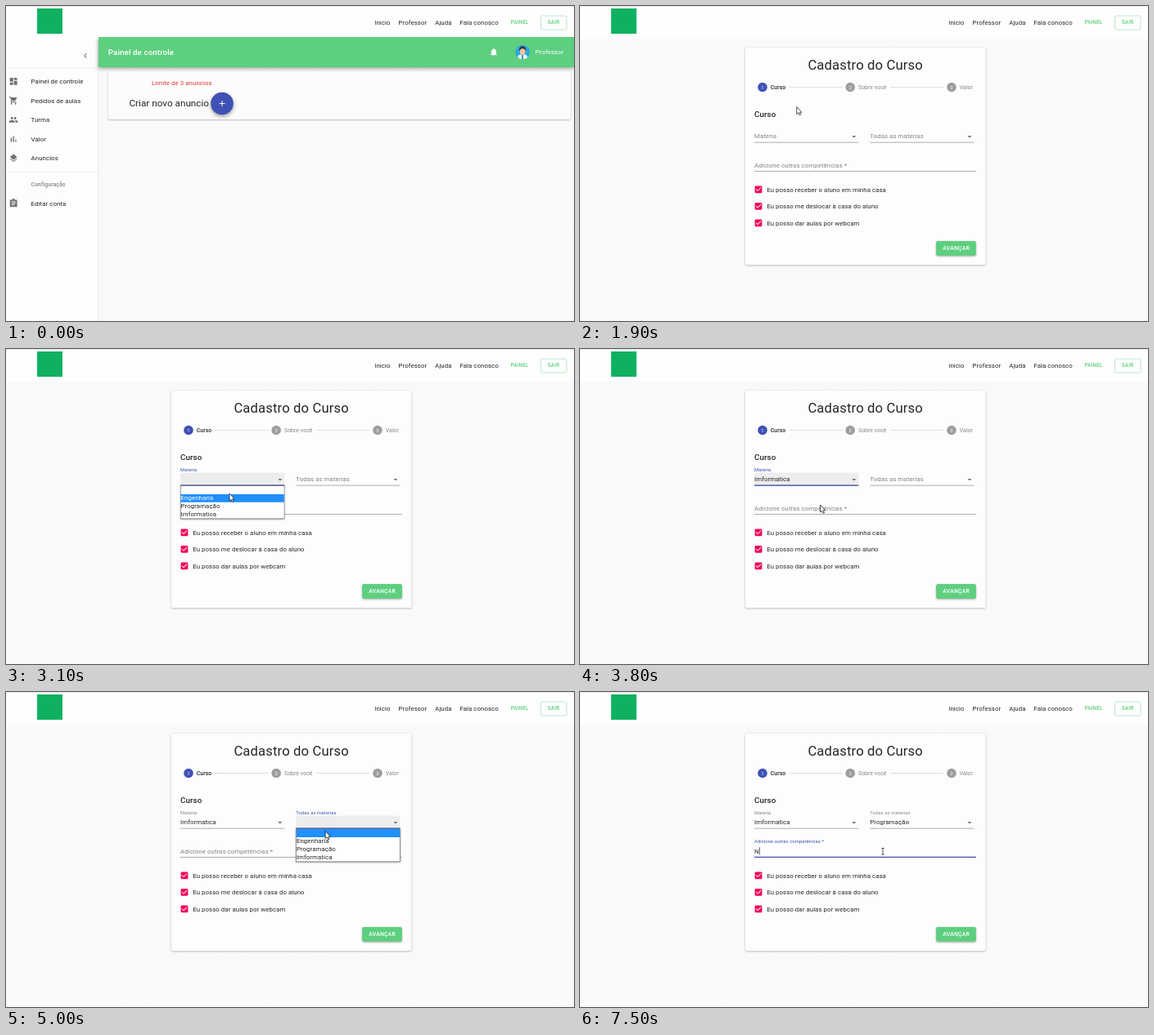
These frames come from a looping animation (694 by 386 pixels, 8 s). An HTML page with a canvas:

```html
<!DOCTYPE html>
<html lang="pt">
<head>
<meta charset="utf-8">
<title>Cadastro do Curso</title>
<style>
  html, body { margin: 0; width: 100%; height: 100%; overflow: hidden; background: #fbfbfb; }
  canvas { display: block; width: 100vw; height: 100vh; }
</style>
</head>
<body>
<canvas id="stage" width="694" height="386"></canvas>
<script>
const W = 694, H = 386, LOOP = 8000, STEP = 100;
const UNIT = 0.49; // screen pixels per interface pixel
const ctx = document.getElementById('stage').getContext('2d');

const INK = '#262626', GREY = '#858585', ICON = '#707070';
const GREEN = '#5dcf7f', BLUE = '#3f51b5', PINK = '#f50057';

const ICONS = {
  back: 'M15.4 7.4L14 6l-6 6 6 6 1.4-1.4L10.8 12z',
  dashboard: 'M3 13h8V3H3zM3 21h8v-6H3zM13 21h8V11h-8zM13 3v6h8V3z',
  cart: 'M1 2h3.3l1 2H21l-5 9H8l-1 2h12v2H5l-.2-2.5 1.8-3L3 4H1zM7 22a2 2 0 1 1 .1 0zM17 22a2 2 0 1 1 .1 0z',
  people: 'M16 11a3 3 0 1 1 .1 0zM8 11a3 3 0 1 1 .1 0zM1 19v-2.5c0-4.6 14-4.6 14 0V19zM17 19v-2.5c0-1.5-.8-2.6-2-3.4 3-.4 8 .9 8 3.4V19z',
  chart: 'M5 9.2h3V19H5zM10.6 5h2.8v14h-2.8zM16.2 13H19v6h-2.8z',
  layers: 'M12 18.5l-7.4-5.7L3 14l9 7 9-7-1.6-1.2zM12 16l9-7-9-7-9 7z',
  clipboard: 'M3 3h6a3 3 0 0 1 6 0h6v18H3zM7 7v2h10V7zM7 11v2h10v-2zM7 15v2h7v-2z',
  bell: 'M12 22a2 2 0 0 0 2-2h-4a2 2 0 0 0 2 2zM18 16v-5c0-3-1.6-5.6-4.5-6.3V4a1.5 1.5 0 0 0-3 0v.7C7.6 5.4 6 8 6 11v5l-2 2v1h16v-1z',
  plus: 'M19 13h-6v6h-2v-6H5v-2h6V5h2v6h6z',
  arrow: 'M7 10l5 5 5-5z',
  checked: 'M5 3h14l2 2v14l-2 2H5l-2-2V5zM10 17l9-9-1.4-1.4L10 14.2l-3.6-3.6L5 12z'
};

const POINTERS = {
  arrow: 'M0 0V9L2 7.3 3.5 10.3 5 9.6 3.6 6.8H6.2Z',
  hand: 'M0 .8Q1 -.6 1.8 .8V4Q3 3.3 3.6 4.2 4.6 3.8 5.2 4.7 6.6 4.5 6.6 5.8V8L5.6 11H.8L-2.4 6.8Q-2.4 5.4 -1.2 6L0 7Z'
};

// time, x, y, pointer shape from that moment on
const PATH = [
  [700, 45, 232, 'hand'], [1000, 82, 188, 'arrow'], [1500, 264.5, 122, 'hand'],
  [1900, 264.7, 123.5, 'arrow'], [2300, 264.7, 123.5, 'arrow'], [2500, 275, 157, 'hand'],
  [2700, 275, 160, 'arrow'], [3100, 273, 177, 'arrow'], [3200, 273, 178, 'arrow'],
  [3600, 262, 202, 'arrow'], [4000, 325, 180, 'arrow'], [4300, 385, 164, 'hand'],
  [4600, 392, 163.5, 'hand'], [4900, 392, 163, 'arrow'], [5200, 385, 192, 'arrow'],
  [5500, 371, 196, 'text'], [6000, 370, 195.3, 'text']
];

const lerp = (a, b, p) => a + (b - a) * p;
const easeOut = p => 1 - (1 - Math.min(1, Math.max(0, p))) ** 3;
const during = (t, from, to) => t >= from && t < to;
const focusLevel = (t, from, to) => easeOut((t - from) / 200) - easeOut((t - to) / 200);
const mixToBlue = p => `rgb(${lerp(133, 63, p)},${lerp(133, 81, p)},${lerp(133, 181, p)})`;

function text(str, x, y, { size = 16, weight = 400, color = INK, spacing = 0.0094, align = 'left' } = {}) {
  const px = size * UNIT;
  ctx.font = `${weight} ${px}px Roboto, sans-serif`;
  ctx.letterSpacing = `${spacing * px}px`;
  ctx.textAlign = align;
  ctx.fillStyle = color;
  ctx.fillText(str, x, y);
}

function box(x, y, w, h, color, radius = 0) {
  ctx.fillStyle = color;
  ctx.beginPath();
  ctx.roundRect(x, y, w, h, radius);
  ctx.fill();
}

function disc(x, y, r, color) {
  ctx.fillStyle = color;
  ctx.beginPath();
  ctx.arc(x, y, r, 0, 7);
  ctx.fill();
}

function line(x1, x2, y, color, thickness = 0.6) {
  box(x1, y - thickness / 2, x2 - x1, thickness, color);
}

function shadowed(blur, dy, alpha, draw) {
  ctx.save();
  ctx.shadowColor = `rgba(0,0,0,${alpha})`;
  ctx.shadowBlur = blur;
  ctx.shadowOffsetY = dy;
  draw();
  ctx.restore();
}

function icon(name, x, y, color = ICON) {
  ctx.save();
  ctx.translate(x, y);
  ctx.scale(UNIT, UNIT);
  ctx.translate(-12, -12);
  ctx.fillStyle = color;
  ctx.fill(new Path2D(ICONS[name]), 'evenodd');
  ctx.restore();
}

// Faint overlapping scales behind the page.
function makeBackdrop() {
  const canvas = document.createElement('canvas');
  canvas.width = W;
  canvas.height = H;
  const c = canvas.getContext('2d');
  c.fillStyle = '#fbfbfb';
  c.strokeStyle = '#f6f6f6';
  c.lineWidth = 0.7;
  c.fillRect(0, 0, W, H);
  for (let row = 0; row * 4 < H + 10; row++)
    for (let x = row % 2 * 8; x < W + 10; x += 16)
      for (let r = 8; r > 1; r -= 2) {
        c.beginPath();
        c.arc(x, row * 4, r, 0, 7);
        c.fill();
        c.stroke();
      }
  return canvas;
}
const backdrop = makeBackdrop();

function drawHeader() {
  box(0, 0, W, 40.5, '#fefefe');
  line(0, W, 0.5, '#e9ebee', 1);
  box(38, 3, 31, 31, '#0fb161');
  text('Inicio', 450.2, 23);
  text('Professor', 479.6, 23);
  text('Ajuda', 524.2, 23);
  text('Fala conosco', 554.4, 23);
  const button = { size: 13, weight: 500, color: GREEN, spacing: 0.0286, align: 'center' };
  text('PAINEL', 627.6, 22.4, button);
  text('SAIR', 669, 22.4, button);
  ctx.strokeStyle = '#a9e4bb';
  ctx.lineWidth = 0.8;
  ctx.beginPath();
  ctx.roundRect(653.5, 12, 31.5, 17, 2);
  ctx.stroke();
}

function drawAvatar(x, y) {
  ctx.save();
  ctx.beginPath();
  ctx.arc(x, y, 8.8, 0, 7);
  ctx.clip();
  box(x - 9, y - 9, 18, 18, '#2aa9e0');
  box(x - 6, y + 3, 12, 9, '#f4f7fa', 4);
  box(x - 0.8, y + 3.5, 1.6, 6, '#2c6fb5');
  disc(x, y - 3, 4.2, '#3a3340');
  disc(x, y - 0.8, 3.5, '#f3c6a0');
  ctx.restore();
}

function drawPanel(t) {
  shadowed(2, 0.8, 0.3, () => box(125, 80, 565, 59, '#fcfcfc', 2));
  text('Limite de 3 anuncios', 178, 96.6, { color: '#d93636' });
  text('Criar novo anuncio', 150.4, 122.6, { size: 24, spacing: 0 });
  shadowed(5, 2, 0.4, () => disc(264, 119.5, 13.8, t >= 1500 ? '#303f9f' : BLUE));
  icon('plus', 264, 119.5, '#fff');

  box(0, 38, 113, H - 38, '#fdfdfd');
  box(112.5, 38, 0.7, H - 38, '#dedede');
  line(0, 113, 76.5, '#e3e3e3');
  line(0, 113, 203, '#e3e3e3');
  icon('back', 97, 61);
  [['dashboard', 'Painel de controle'], ['cart', 'Pedidos de aulas'], ['people', 'Turma'],
   ['chart', 'Valor'], ['layers', 'Anuncios']].forEach(([name, label], i) => {
    const y = 92.3 + i * 23.55;
    icon(name, 9.2, y);
    text(label, 30.6, y + 2.8);
  });
  text('Configuração', 30.6, 220.5, { size: 14, weight: 500, color: GREY, spacing: 0.01 });
  icon('clipboard', 9.2, 241.8);
  text('Editar conta', 30.6, 244.5);

  shadowed(5, 1.5, 0.4, () => box(113, 38, W - 113, 37, GREEN));
  drawHeader();
  box(113, 38, W - 113, 37, GREEN);
  text('Painel de controle', 124.8, 59.8, { size: 20, weight: 500, color: '#fff', spacing: 0.0075 });
  icon('bell', 596, 56.5, '#fff');
  drawAvatar(631.2, 56.5);
  text('Professor', 646.8, 59.2, { color: '#fff' });
}

function drawStepper() {
  [[223, 'Curso'], [330.2, 'Sobre você'], [454, 'Valor']].forEach(([x, label], i) => {
    const active = i === 0;
    disc(x, 99.5, 5.8, active ? BLUE : '#9d9d9d');
    text(i + 1, x, 101.6, { size: 12, color: '#fff', spacing: 0, align: 'center' });
    text(label, x + 9.8, 101.9, { size: 14, weight: active ? 500 : 400, color: active ? INK : GREY, spacing: 0.01 });
  });
  line(256, 321, 99.5, '#bdbdbd');
  line(379, 444, 99.5, '#bdbdbd');
}

function drawField({ label, x, right, baseline, shrink, focus, hover, value = '' }) {
  const lineY = baseline + 4.8;
  text(label, x, baseline - 12.7 * shrink, { size: lerp(16, 12, shrink), color: mixToBlue(focus) });
  text(value, x, baseline);
  line(x, right, lineY, hover ? INK : '#949494', hover ? 1 : 0.6);
  if (focus > 0) {
    const middle = (x + right) / 2, half = (right - x) / 2 * focus;
    line(middle - half, middle + half, lineY, BLUE, 1.1);
  }
}

function drawSelect(field) {
  const { x, right, open } = field;
  if (field.active) box(x, 151.5, right - x, 15.5, '#ededed', [2, 2, 0, 0]);
  drawField({ ...field, baseline: 162.3 });
  icon('arrow', right - 5.6, 160, ICON);
}

function drawOptions(x, right, pointerY) {
  const top = 167.7, rowHeight = 9.9;
  const chosen = Math.max(0, Math.min(3, Math.floor((pointerY - top) / rowHeight + 0.15)));
  shadowed(2, 1, 0.35, () => box(x, top - 0.3, right - x, 40.8, '#6f6f6f'));
  box(x + 0.6, top + 0.3, right - x - 1.2, 39.6, '#fff');
  box(x + 0.6, top + 0.3 + chosen * rowHeight, right - x - 1.2, rowHeight, '#1e90ff');
  ['', 'Engenharia', 'Programação', 'Imformatica'].forEach((option, i) =>
    text(option, x + 0.6, top + 7.7 + i * rowHeight, { color: i === chosen ? '#fff' : INK }));
}

function drawForm(t, pointer) {
  drawHeader();
  shadowed(2.5, 0.8, 0.3, () => box(202, 51, 293.5, 266.3, '#fdfdfd', 2));
  text('Cadastro do Curso', 348.6, 77.5, { size: 34, spacing: 0.00735, align: 'center' });
  drawStepper();
  text('Curso', 213, 136.2, { size: 20, weight: 500, spacing: 0.0075 });

  const subject = { x: 213, right: 340.4 }, topic = { x: 354.3, right: 481.6 };
  const typed = t >= 7500 ? 'N' : '';
  const inputFocus = focusLevel(t, 5582, 1e5);
  drawSelect({
    ...subject, label: 'Materia', value: t >= 3600 ? 'Imformatica' : '',
    shrink: easeOut((t - 2600) / 200), focus: focusLevel(t, 2600, 4100),
    active: during(t, 2600, 4100), hover: during(t, 2500, 2700)
  });
  drawSelect({
    ...topic, label: 'Todas as materias', value: t >= 5300 ? 'Programação' : '',
    shrink: easeOut((t - 4800) / 200), focus: focusLevel(t, 4800, 5582),
    active: during(t, 4800, 5582), hover: during(t, 4300, 4900)
  });
  drawField({
    label: 'Adicione outras competências *', x: 213, right: 483.8, baseline: 197.6,
    shrink: inputFocus, focus: inputFocus, hover: t >= 5500, value: typed
  });
  const caretOn = during(t, 5600, 6100) || during(t, 6700, 7200) || t >= 7500;
  if (caretOn) box(typed ? 219 : 213.1, 190.3, 0.7, 9.3, INK);

  ['Eu posso receber o aluno em minha casa', 'Eu posso me deslocar à casa do aluno',
   'Eu posso dar aulas por webcam'].forEach((label, i) => {
    const y = 224.8 + i * 20.55;
    icon('checked', 218, y, PINK);
    text(label, 228.2, y + 2.7);
  });
  shadowed(2.5, 1, 0.35, () => box(435.2, 288, 48.6, 17.8, GREEN, 2));
  text('AVANÇAR', 459.6, 299.2, { size: 14, weight: 500, color: '#fff', spacing: 0.0286, align: 'center' });

  if (during(t, 2700, 3600)) drawOptions(subject.x, subject.right, pointer.y);
  if (during(t, 4900, 5300)) drawOptions(topic.x, topic.right, pointer.y);
}

function pointerAt(t) {
  const next = PATH.findIndex(key => key[0] > t);
  if (next === 0) return { x: 0, y: 0, shape: null };
  const from = PATH[(next < 0 ? PATH.length : next) - 1];
  const to = next < 0 ? from : PATH[next];
  const raw = to === from ? 0 : (t - from[0]) / (to[0] - from[0]);
  const p = raw * raw * (3 - 2 * raw);
  return { x: lerp(from[1], to[1], p), y: lerp(from[2], to[2], p), shape: from[3] };
}

function drawPointer({ x, y, shape }) {
  if (!shape) return;
  if (shape === 'text') {
    box(x - 0.4, y - 3.8, 0.8, 7.6, '#333');
    line(x - 1.7, x + 1.7, y - 3.8, '#333', 0.8);
    line(x - 1.7, x + 1.7, y + 3.8, '#333', 0.8);
    return;
  }
  ctx.save();
  ctx.translate(x, y);
  const outline = new Path2D(POINTERS[shape]);
  ctx.fillStyle = '#fff';
  ctx.strokeStyle = '#222';
  ctx.lineWidth = 0.8;
  ctx.lineJoin = 'round';
  ctx.fill(outline);
  ctx.stroke(outline);
  ctx.restore();
}

function render() {
  const t = Math.floor(performance.now() % LOOP / STEP) * STEP;
  const pointer = pointerAt(t);
  ctx.drawImage(backdrop, 0, 0);
  if (t < 1900) drawPanel(t);
  else drawForm(t, pointer);
  drawPointer(pointer);
  requestAnimationFrame(render);
}
render();
</script>
</body>
</html>
```
